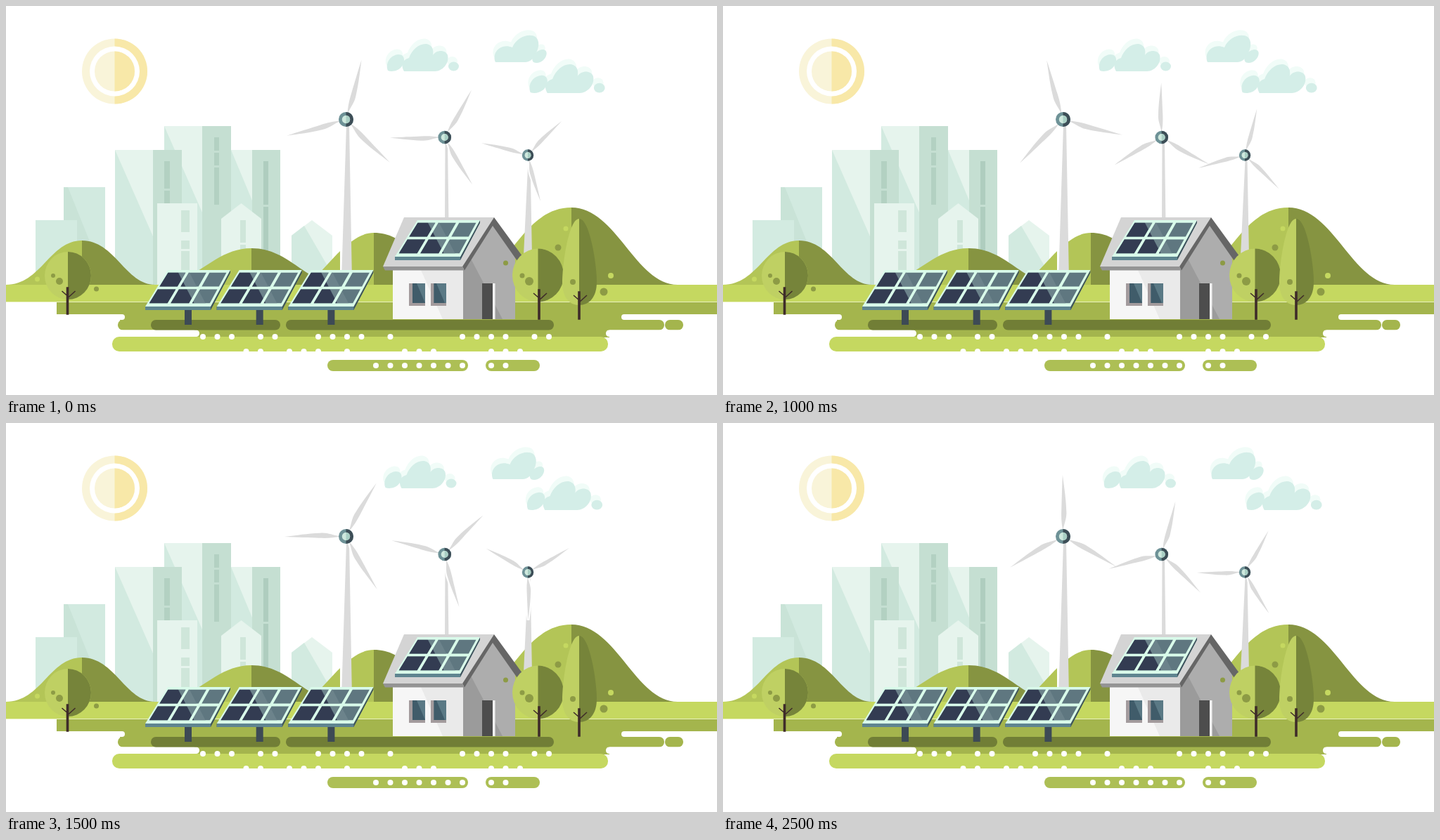
Animation, 1011 px wide and 554 px high, one loop 3000 ms. Source, as an HTML page:

```html
<!DOCTYPE html>
<html lang="en">
<head>
<meta charset="utf-8">
<title>Green energy</title>
<style>
html, body { margin: 0; width: 100%; height: 100%; overflow: hidden; background: #fff; }
svg { display: block; width: 100%; height: 100%; }
</style>
</head>
<body>
<svg viewBox="0 0 1011 554">
<defs>
  <path id="blade" d="M0-8C2-20 6-26 5-37C4.500-55 2-70 0-87.500C-1-70-1.500-50-2-38C-2.500-26-2-18 0-8Z"/>
  <g id="puff">
    <path d="M566 93C560 82 566 76 573 74C577 62 588 53 598 54C608 56 608 65 607 70C612 62 625 62 628 70C631 82 620 93 610 93Z"/>
    <path d="M543 92C539 82 546 70 558 69C568 69 568 80 562 87C557 93 548 94 543 92Z"/>
    <ellipse cx="636.500" cy="86" rx="7.500" ry="6.500"/>
  </g>
  <g id="wisp">
    <path d="M696 80C690 66 704 52 720 59C726 44 744 38 753 44C760 50 757 62 754 66C752 74 745 80 738 80Z"/>
    <path d="M750 80C745 74 752 64 762 62C770 61 771 70 764 77C760 81 754 82 750 80Z"/>
  </g>
  <g id="sky">
    <use href="#puff"/>
    <use href="#wisp"/>
    <use href="#puff" transform="translate(744 124)scale(1.05)translate(-541.500 -93)"/>
  </g>
</defs>

<!-- sun -->
<circle cx="154.500" cy="93" r="46.500" fill="#f9f4d9"/>
<path d="M154.500 46.500a46.500 46.500 0 0 1 0 93Z" fill="#f8e8a8"/>
<circle cx="154.500" cy="93" r="35.500" fill="#fff"/>
<circle cx="154.500" cy="93" r="28.500" fill="#f9f4d9"/>
<path d="M154.500 64.500a28.500 28.500 0 0 1 0 57Z" fill="#f8e8a8"/>

<g id="clouds">
  <use href="#sky" x="-2" y="-7.500" fill="#f1fcf8"/>
  <use href="#sky" fill="#d4eee8"/>
</g>

<!-- city -->
<g fill="#d2eae0">
  <path d="M82 258H141V397H82Z"/>
  <path d="M82 258H88L141 390V397H82Z" fill="#c9e3d7"/>
  <path d="M42 305H101V397H42Z" fill="#d3ebe1"/>
  <path d="M320 205H350V397H320Z" fill="#e6f4ed"/>
  <path d="M320 205L350 277V397H320Z"/>
  <path d="M350 205H390V397H350Z" fill="#c5dfd2"/>
  <path d="M366 221H373V283H366ZM366 286H373V360H366Z" fill="#afcdbf"/>
  <path d="M225 171H279V397H225Z" fill="#e6f4ed"/>
  <path d="M225 171L279 294V397H225Z"/>
  <path d="M279 171H320V397H279Z" fill="#c5dfd2"/>
  <path d="M296 187H303V206H296ZM296 209H303V227H296ZM296 230H303V283H296Z" fill="#b3d1c2"/>
  <path d="M155 205H209V397H155Z" fill="#e6f4ed"/>
  <path d="M155 205L209 328V397H155Z"/>
  <path d="M209 205H250V397H209Z" fill="#c5dfd2"/>
  <path d="M225 221H233V260H225ZM225 263H233V282H225Z" fill="#b3d1c2"/>
  <path d="M215 281H272V397H215ZM306 303L334.500 281L363 303V397H306Z" fill="#e6f4ed"/>
  <path d="M249 291H261V322H249ZM249 334H261V346H249ZM249 349H261V380H249ZM333 305H341V337H333ZM333 340H341V352H333Z" fill="#cfe6da"/>
  <path d="M406 327L435 305L464 327V397H406Z" fill="#e6f4ed"/>
  <path d="M406 327L424 313L464 382V397H406Z"/>
</g>

<!-- hills -->
<g fill="#b3c557">
  <path d="M0 397C50 397 62 334 108 334V397ZM215 397C270 397 295 345 349 345V397ZM430 397L471 353C490 334 506 323 523 323V397ZM660 397C715 380 735 287 804 287V397Z"/>
  <path d="M108 334C155 334 170 397 212 397H108ZM349 345C405 345 425 397 480 397H349ZM523 323C545 323 560 332 578 350V397H523ZM804 287C868 287 895 397 955 397H804Z" fill="#869441"/>
</g>
<path d="M475 330H491V376H475Z" fill="#fff"/>

<!-- ground -->
<path d="M0 397H1011V421H0Z" fill="#c5d860"/>
<g fill="#a4b54d">
  <path d="M72 421.500H1011V439H72ZM162 439H884V448H162ZM268 460H858V472H268Z"/>
  <rect x="159" y="447" width="777" height="14.500" rx="7"/>
  <rect x="937" y="447" width="26" height="14.500" rx="7"/>
</g>
<path d="M0 421.500H1011" stroke="#e9f0bd"/>
<g fill="#fff">
  <rect x="-20" y="439" width="189" height="8" rx="4"/>
  <rect x="875" y="439" width="160" height="8" rx="4"/>
  <rect x="100" y="461.500" width="175" height="9.500" rx="4.500"/>
  <rect x="853" y="461.500" width="170" height="9.500" rx="4.500"/>
</g>
<rect x="151" y="471" width="705" height="21" rx="10" fill="#c5d860"/>
<g fill="#adbf55">
  <rect x="457" y="504" width="200" height="16" rx="8"/>
  <rect x="682" y="504" width="77" height="16" rx="8"/>
</g>
<g fill="#717e36">
  <rect x="206" y="447" width="184" height="14.500" rx="7"/>
  <rect x="398" y="447" width="381" height="14.500" rx="7"/>
</g>
<g id="dots" fill="#fff"></g>

<!-- wind turbines -->
<path d="M484 170H488L492 390H477ZM624.500 195H628L629.500 310H624ZM742.500 220H745.500L748 355H736Z" fill="#dbdbdb"/>
<g id="turbines"></g>

<!-- house -->
<path d="M550 370H650V446H550Z" fill="#f6f6f6"/>
<path d="M590 376H650V446H621Z" fill="#eaeaea"/>
<path d="M692 311L724 358V446H650V377Z" fill="#adadad"/>
<path d="M650 376L661 360L706 446H650Z" fill="#9b9b9b"/>
<path d="M677 395H692V446H677Z" fill="#4d4d4d"/>
<path d="M692 395H695.500V446H692Z" fill="#f3f3f3"/>
<path d="M573 395H596V427H573ZM604 395H626V427H604Z" fill="#a39b9d"/>
<path d="M578 395H596V423H578ZM608.500 395H626V423H608.500Z" fill="#5a7985"/>
<path d="M578 395H584L596 423H578ZM608.500 395H612L624 423H608.500Z" fill="#405c6a"/>
<path d="M566 301H694L649 371H536Z" fill="#d4d4d4"/>
<path d="M536 371H649L652 376.500H539Z" fill="#949494"/>
<path d="M694 301L734 356L727 363L692 313L652 376.500L649 371Z" fill="#666"/>

<g id="panels"></g>

<!-- trees -->
<g id="trees"></g>
</svg>
<script>
const $ = id => document.getElementById(id);
const circle = (x, y, r, fill) => `<circle cx="${x}" cy="${y}" r="${r}" fill="${fill}"/>`;
const shape = (points, fill) => `<polygon points="${points.join(' ')}" fill="${fill}"/>`;

// white dots on the ground, one column every 20.5 px
const dotRows = {
  471: [0, 1, 2, 4, 5, 8, 9, 10, 11, 13, 18, 19, 20, 21, 23, 24],
  492: [3, 4, 6, 7, 8, 10, 14, 15, 16, 20, 21, 22],
  512: [12, 13, 14, 15, 16, 17, 18, 20, 21]
};
for (const y in dotRows)
  $('dots').innerHTML += dotRows[y].map(i => circle(280 + i * 20.5, y, 4, '#fff')).join('');

// solar panel, bottom left corner of the glass at (0, 52)
function panel(x, y, post) {
  const at = (u, v) => [32 - 32 * v + u * (89 + 4 * v), 52 * v];
  let cells = '';
  for (const [v0, v1] of [[.07, .45], [.53, .91]])
    for (const [u0, u1] of [[.03, .31], [.36, .64], [.69, .96]])
      cells += 'M' + [at(u0, v0), at(u1, v0), at(u1, v1), at(u0, v1)].join('L') + 'Z';
  const id = 'cells' + x;
  return `<g transform="translate(${x} ${y})">
    ${post ? '<path d="M56 55H66V78H56Z" fill="#3d4a55"/>' : ''}
    ${shape([[0, 52], [93, 52], [121, 0], [121, 4], [93, 57], [0, 57]], '#3d545e')}
    <path d="M0 52H93V57H0Z" fill="#5f8590"/>
    ${shape([at(0, 0), at(1, 0), at(1, 1), at(0, 1)], '#d9fbea')}
    <clipPath id="${id}"><path d="${cells}"/></clipPath>
    <g clip-path="url(#${id})">
      <path d="M0 0H125V55H0Z" fill="#5f7780"/>
      <path d="M45 0H61L88 52H72Z" fill="#6c838b"/>
      <path d="M0 0H45L72 52H0Z" fill="#333c52"/>
    </g></g>`;
}
$('panels').innerHTML = [0, 1, 2].map(i => panel(198 + i * 101.7, 376, true)).join('') + panel(553, 305);

const light = '#bfd063', dark = '#76843a', spot = '#8d9b45', lime = '#c5d860';
const trunk = (x, top, bottom) =>
  `<path d="M${x - 1} ${bottom}V${top}h2V${bottom}ZM${x} ${top + 15}l11-10M${x} ${top + 12}l-8-7"
    fill="#3f2c2a" stroke="#3f2c2a" stroke-width="1.6"/>`;
const roundTree = (x, y, rx, ry) =>
  `<ellipse cx="${x}" cy="${y}" rx="${rx}" ry="${ry}" fill="${light}"/>
   <path d="M${x} ${y - ry}a${rx} ${ry} 0 0 1 0 ${2 * ry}Z" fill="${dark}"/>`;
$('trees').innerHTML =
  roundTree(88, 384, 33, 34) + trunk(87.5, 401, 439) +
  roundTree(756.5, 383.5, 36.5, 38) + trunk(758, 404, 446) +
  `<path d="M815 303C800 303 791 368 791 393C791 415 801 426 815 426Z" fill="${light}"/>
   <path d="M815 303C830 303 840 368 840 393C840 415 829 426 815 426Z" fill="${dark}"/>` +
  trunk(815, 407, 446) +
  [[76, 392, 5], [67, 384, 3], [128.5, 403, 3.5], [744, 392, 6], [734, 384, 3.5],
   [710.5, 366, 3.5], [806, 393, 4], [785, 344, 4.5], [850, 407, 5.5]].map(c => circle(...c, spot)).join('') +
  [[44.5, 389, 3.5], [796, 317, 3.5], [860, 384, 4]].map(c => circle(...c, lime)).join('');

// x, y, scale, start angle, index of the mirrored blade
const turbines = [[483.5, 161.5, 1, 14.6, 2], [623.7, 187, .89, 29.6, 2], [742, 212.5, .78, 44.6, 0]];
const hub = circle(0, 0, 10.5, '#6e9297') + '<path d="M0-10.5a10.5 10.5 0 0 1 0 21Z" fill="#3d4e57"/>' +
  circle(0, 0, 5.7, '#cfe9de') + '<path d="M0-5.7a5.7 5.7 0 0 1 0 11.4Z" fill="#a9cfc4"/>';
const place = ([x, y, s], inner) => `<g transform="translate(${x} ${y})scale(${s})">${inner}</g>`;
const blades = ([, , , , flip]) => '<g class="rotor">' + [0, 1, 2].map(i =>
  `<use href="#blade" transform="rotate(${i * 120})scale(${i === flip ? -1 : 1} 1)"/>`).join('') + '</g>';
const layer = (attrs, draw) => `<g ${attrs}>${turbines.map(t => place(t, draw(t))).join('')}</g>`;
$('turbines').innerHTML = layer('fill="#fff" stroke="#fff" stroke-width="5"', blades) +
  layer('fill="#dbdbdb"', blades) + layer('', () => hub);
const rotors = document.querySelectorAll('.rotor');

const drift = [0, 1, 2, 1, 0, 0];
function draw(now) {
  const step = Math.floor(now % 3000 / 500);
  rotors.forEach((r, i) => r.setAttribute('transform', `rotate(${turbines[i % 3][3] + step * 45})`));
  $('clouds').setAttribute('transform', `translate(${-3.5 * drift[step]} 0)`);
}
const start = performance.now();
function loop() {
  draw(performance.now() - start);
  requestAnimationFrame(loop);
}
loop();
</script>
</body>
</html>
```
